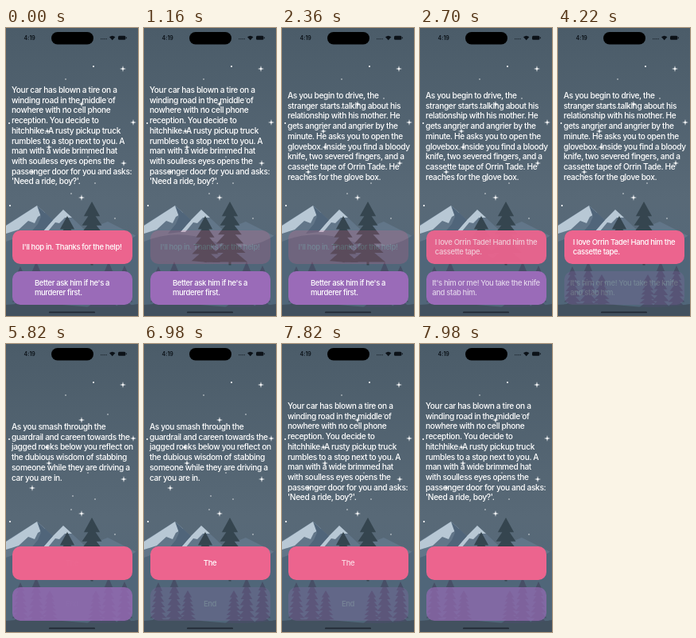
An HTML page for the animation above (8000 ms loop, 166 by 360 pixels).

```html
<!DOCTYPE html>
<html lang="en">
<head>
<meta charset="utf-8">
<title>Story game</title>
<style>
  html, body { margin: 0; width: 100%; height: 100%; overflow: hidden; background: #536472; }
  body { position: relative; font: 500 10.2px/12.7px Inter, "Liberation Sans", sans-serif; letter-spacing: -.036em; color: #fff; }
  svg { position: absolute; left: 0; top: 0; width: 166px; height: 360px; }
  #story { position: absolute; left: 7px; top: 135px; transform: translateY(-50%); white-space: pre; }
  .choice { position: absolute; left: 7.5px; width: 151px; height: 42px; border-radius: 10px;
            display: flex; align-items: center; justify-content: center; font-size: 9.5px; line-height: 11.8px; white-space: pre; }
  #first { top: 253px; background: #ec648e; }
  #second { top: 303.5px; background: #9a6bb8; }
</style>
</head>
<body>
<svg viewBox="0 0 166 360">
  <defs>
    <linearGradient id="sky" x2="0" y2="1">
      <stop offset="0" stop-color="#4b5c69"/>
      <stop offset=".6" stop-color="#586977"/>
      <stop offset="1" stop-color="#52677a"/>
    </linearGradient>
  </defs>
  <rect width="166" height="360" fill="url(#sky)"/>
  <g id="stars" fill="#fff"></g>

  <path d="M0 246 39 222 59 240 72 227 100 253 128 242 166 261V310H0Z" fill="#627689"/>
  <path d="M0 247 39 222 49 231 40 236 36 244 28 241 16 252 0 257Z" fill="#b8c8d5"/>
  <path d="M45 255 59 240 72 227 83 237 74 237 67 244 62 243 52 255Z" fill="#b8c8d5"/>
  <path d="M39 222 59 240 46 255 30 257 40 245 44 236Z" fill="#50657a"/>
  <path d="M0 267Q40 250 86 266T166 258V360H0Z" fill="#50667a"/>
  <g id="bigTrees" fill="#35454f"></g>
  <path d="M0 294Q45 287 84 294T166 292V360H0Z" fill="#506679"/>
  <g id="smallTrees" fill="#474f66"></g>
  <path d="M0 346Q40 342 83 347T166 345V360H0Z" fill="#42515f"/>

  <text x="22.5" y="15" font-size="7" font-weight="600" letter-spacing="0" fill="#0c1218">4:19</text>
  <rect x="57" y="5" width="53" height="15.5" rx="7.75" fill="#000"/>
  <g fill="#0c1218">
    <path d="M119 13h1.3v1.3h-1.3zm2.2 0h1.3v1.3h-1.3zm2.2 0h1.3v1.3h-1.3zm2.2 0h1.3v1.3h-1.3z" opacity=".6"/>
    <path d="M130 11.3Q133.7 8 137.4 11.3L133.7 15.2Z"/>
    <rect x="141" y="9.8" width="9.4" height="5" rx="1.5"/>
    <rect x="151" y="11.4" width=".8" height="1.8"/>
  </g>
  <rect x="54" y="354.5" width="58" height="1.8" rx=".9" fill="#161d26" opacity=".75"/>
</svg>
<div id="story"></div>
<div class="choice" id="first"><span></span></div>
<div class="choice" id="second"><span></span></div>

<script>
const $ = id => document.getElementById(id);

// Scenery
const sparkle = (x, y, r = 4) =>
  `<path d="M${x} ${y - r}l.7 ${r - .7} ${r - .7} .7 ${.7 - r} .7-.7 ${r - .7}-.7 ${.7 - r} ${.7 - r}-.7 ${r - .7}-.7z"/>`;
const dot = (x, y, r = .7) => `<circle cx="${x}" cy="${y}" r="${r}"/>`;
$('stars').innerHTML =
  [[147, 51], [160, 118], [95, 95], [52, 129], [54, 149], [148, 169], [33, 180], [95, 212]]
    .map(p => sparkle(...p)).join('') +
  [[110, 48, 1], [4, 119, 1], [5, 222, 1.1], [75, 100], [128, 88], [103, 161], [112, 194],
   [84, 190], [82, 207], [137, 238], [75, 64]].map(p => dot(...p)).join('');

function tree(x, top, width, height, tiers) {
  let d = '';
  const step = height / (tiers + 1);
  for (let i = 0; i < tiers; i++) {
    const half = width / 2 * (.35 + .65 * (i + 1) / tiers);
    const y = top + i * step;
    d += `M${x} ${y}L${x + half} ${y + step * 1.6}H${x - half}Z`;
  }
  return `<path d="${d}M${x - 1.5} ${top + height * .8}h3V${top + height}h-3z"/>`;
}
$('bigTrees').innerHTML = tree(77, 235, 38, 62, 5) + tree(108, 217, 44, 80, 6);
$('smallTrees').innerHTML = [[18, 298], [38, 292], [55, 308], [113, 308], [129, 292], [149, 297]]
  .map(([x, top]) => tree(x, top, 23, 352 - top, 7)).join('');

// Story
const pages = [
  {
    story: `Your car has blown a tire on a
winding road in the middle of
nowhere with no cell phone
reception. You decide to
hitchhike. A rusty pickup truck
rumbles to a stop next to you. A
man with a wide brimmed hat
with soulless eyes opens the
passenger door for you and asks:
'Need a ride, boy?'.`,
    choices: ["I'll hop in. Thanks for the help!", "Better ask him if he's a\nmurderer first."]
  },
  {
    story: `As you begin to drive, the
stranger starts talking about his
relationship with his mother. He
gets angrier and angrier by the
minute. He asks you to open the
glovebox. Inside you find a bloody
knife, two severed fingers, and a
cassette tape of Orrin Tade. He
reaches for the glove box.`,
    choices: ["I love Orrin Tade! Hand him the\ncassette tape.", "It's him or me! You take the knife\nand stab him."]
  },
  {
    story: `As you smash through the
guardrail and careen towards the
jagged rocks below you reflect on
the dubious wisdom of stabbing
someone while they are driving a
car you are in.`,
    choices: ['The', 'End']
  }
];
const LOOP = 8000, PRESSED = .2;
const scenes = [
  { at: -1000, page: 0, pressAt: 1160, pressed: 0 },
  { at: 2360, page: 1, pressAt: 4220, pressed: 1 },
  { at: 5560, page: 2, pressAt: 6980, pressed: 1 },
  { at: 7760, page: 0, pressAt: Infinity }
];
const buttons = [$('first'), $('second')];
const clamp = v => Math.min(1, Math.max(0, v));
const smooth = v => (v = clamp(v), v * v * (3 - 2 * v));
const setText = (el, text) => { if (el.textContent !== text) el.textContent = text; };

function draw(t) {
  const index = scenes.findLastIndex(s => t >= s.at);
  const scene = scenes[index], previous = scenes[index - 1];
  const age = t - scene.at;
  const leaving = previous && age < 220;
  const labels = pages[(leaving ? previous : scene).page].choices;
  const labelOpacity = leaving ? 1 - smooth(age / 200) : 1 - (1 - clamp((age - 260) / 180)) ** 2;

  setText($('story'), pages[scene.page].story);
  buttons.forEach((button, i) => {
    let opacity = 1;
    if (previous && previous.pressed === i) opacity = PRESSED + (1 - PRESSED) * smooth(age / 400);
    if (t >= scene.pressAt && scene.pressed === i) opacity = PRESSED;
    button.style.opacity = opacity;
    const label = button.firstElementChild;
    setText(label, labels[i]);
    label.style.opacity = labelOpacity;
  });
}

const start = performance.now();
function tick() {
  draw((performance.now() - start) % LOOP);
  requestAnimationFrame(tick);
}
tick();
</script>
</body>
</html>
```
